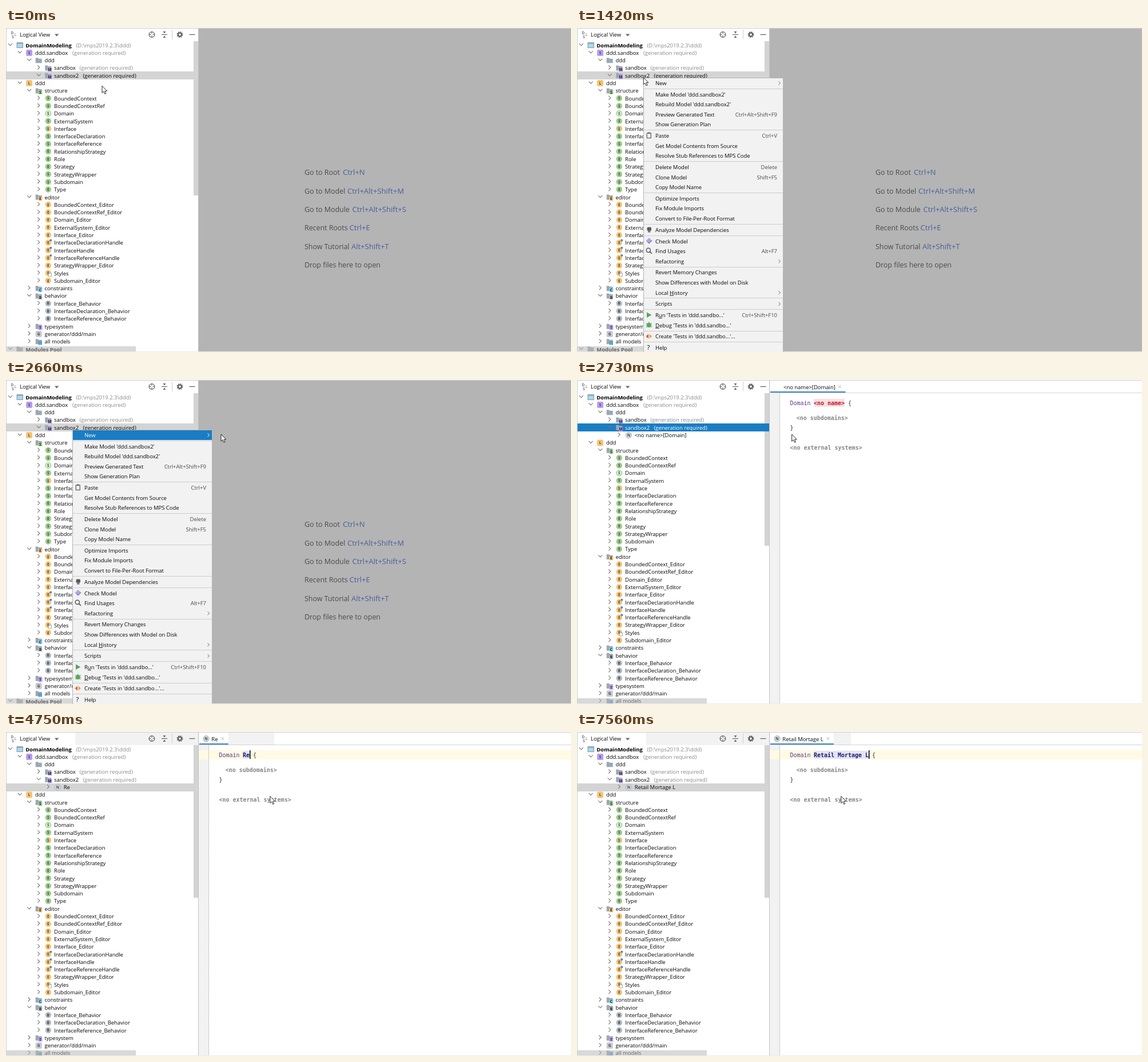
An HTML page for the animation above (8000 ms loop, 988 by 567 pixels).

```html
<!DOCTYPE html>
<html lang="en">
<head>
<meta charset="utf-8">
<title>Domain modeling</title>
<style>
html, body { margin: 0; width: 100%; height: 100%; overflow: hidden; background: #fff; }
svg { display: block; width: 988px; height: 567px; }
text { font: 9.5px "Open Sans", "Noto Sans", sans-serif; letter-spacing: -.04px; fill: #080808; white-space: pre; }
.b { font-weight: 700; fill: #000; }
.dim { fill: #8a8a8a; }
.badge { font-size: 6.5px; font-weight: 700; text-anchor: middle; letter-spacing: 0; }
.end { text-anchor: end; fill: #4a4a4a; }
.hint { font-size: 12.4px; fill: #4b4b4b; letter-spacing: 0; }
.key { font-size: 13px; fill: #4a5f9b; letter-spacing: 0; }
.code { font: 9.97px "DejaVu Sans Mono", monospace; letter-spacing: 0; }
.code.b { font-weight: 700; }
.focus text:not(.badge) { fill: #fff; }
.lit text:not(.badge) { fill: #080808; }
</style>
</head>
<body>
<svg id="stage" viewBox="0 0 988 567"></svg>
<script>
const NS = "http://www.w3.org/2000/svg";
const stage = document.getElementById("stage");
const LOOP = 8000, PITCH = 13.3, TOP = 30.1;
const GREEN = "#9ccf8d", ORANGE = "#f7c473", GRAY = "#b4bec6", PURPLE = "#b99bf0", BLUE = "#1a7dc4";

function el(parent, name, attrs = {}, content) {
  const node = document.createElementNS(NS, name);
  for (const k in attrs) node.setAttribute(k, attrs[k]);
  if (content !== undefined) node.textContent = content;
  return parent.appendChild(node);
}
const group = (p, attrs) => el(p, "g", attrs);
const rect = (p, x, y, width, height, fill, more) => el(p, "rect", { x, y, width, height, fill, ...more });
const circle = (p, cx, cy, r, fill, more) => el(p, "circle", { cx, cy, r, fill, ...more });
const line = (p, d, stroke, w = 1, more) => el(p, "path", { d, stroke, "stroke-width": w, fill: "none", ...more });
const shape = (p, d, fill) => el(p, "path", { d, fill });
const label = (p, x, y, s, cls = "") => el(p, "text", { x, y: y + 3.4, class: cls }, s);
const show = (node, on) => node.setAttribute("display", on ? "inline" : "none");

function badge(p, x, y, s, fill = "#444") {
  el(p, "text", { x, y: y + 2.4, class: "badge", style: `fill:${fill}` }, s);
}

function chevron(p, x, y, open) {
  line(p, open ? `M${x - 3.5} ${y - 2.5}l3.5 3.5 3.5-3.5` : `M${x - 2} ${y - 4}l3.5 3.5-3.5 3.5`, "#777", 1.1);
}

function folder(p, x, y) {
  shape(p, `M${x - 5.5} ${y - 4.5}h4l1.5 1.5h5.5v7.5h-11z`, "#9ba8b1");
}

// Icon kinds: tile, concept disc, node, module, folder with an optional badge
function icon(p, kind, x, y, s, color) {
  if (kind === "tile") {
    rect(p, x - 5.5, y - 5.5, 11, 11, color, { rx: 2.5 });
    badge(p, x, y, s);
  } else if (kind === "disc") {
    const ring = color === "ring", half = color === "half";
    circle(p, x, y - .3, 5.3, ring ? "#d9f0d0" : half ? GREEN : color);
    if (ring) circle(p, x, y - .3, 4.9, "none", { stroke: "#7dbd6b", "stroke-width": .9 });
    if (half) shape(p, `M${x} ${y - 5.6}a5.3 5.3 0 0 1 0 10.6z`, ORANGE);
    badge(p, x, y - .3, s);
  } else if (kind === "node") {
    circle(p, x, y, 5.2, "#d3d9de", { stroke: "#9aa5ad", "stroke-width": .8 });
    badge(p, x, y, s);
  } else if (kind === "module") {
    rect(p, x - 5.5, y - 5, 11.5, 10, "#8fa0ac");
    rect(p, x - 4.3, y - 2.5, 9, 6.3, "#a9dcf2");
  } else {
    folder(p, x, y);
    if (s === "#") {
      for (const [i, j] of [[0, 0], [3.4, 0], [0, 3.4], [3.4, 3.4]]) rect(p, x + i - .5, y + j - .5, 2.8, 2.8, "#3b9fd0");
    } else if (s) {
      rect(p, x - .8, y - .8, 7, 6.8, color);
      badge(p, x + 2.7, y + 2.7, s, "#222");
    }
  }
}

function row(p, index, [depth, open, kind, s, color, text, note, extra]) {
  const g = group(p), y = TOP + index * PITCH, step = depth * 16.6;
  chevron(g, 7.5 + step, y - .5, open);
  icon(g, kind, 24 + step, y, s, color);
  if (extra === "dot") circle(g, 28.5 + step, y - 4.5, 2, "#4a86cf");
  if (extra === "doc") rect(g, 24.5 + step, y, 5, 5.5, "#fff", { stroke: "#8d98a0", "stroke-width": .8 });
  const t = label(g, 34.3 + step, y, text, depth ? "" : "b");
  if (note) label(g, note[0], y, note[1], "dim");
  return { g, t };
}

// Project tree
const NEEDS = "(generation required)";
const concepts = "BoundedContext:S BoundedContextRef:S Domain:S:ring ExternalSystem:S Interface:S:half InterfaceDeclaration:S InterfaceReference:S RelationshipStrategy:E Role:E Strategy:E StrategyWrapper:S Subdomain:S Type:E";
const editors = "BoundedContext_Editor BoundedContextRef_Editor Domain_Editor ExternalSystem_Editor Interface_Editor InterfaceDeclarationHandle InterfaceHandle InterfaceReferenceHandle StrategyWrapper_Editor Styles Subdomain_Editor";
const upper = [
  [0, 1, "module", "", "", "DomainModeling", [122.5, "(D:\\mps2019.2.3\\ddd)"]],
  [1, 1, "tile", "S", PURPLE, "ddd.sandbox", [116, NEEDS]],
  [2, 1, "folder", "", "", "ddd"],
  [3, 0, "folder", "M", PURPLE, "sandbox", [128.5, NEEDS]],
  [3, 1, "folder", "M", PURPLE, "sandbox2", [134.5, NEEDS]]
];
const lower = [
  [1, 1, "tile", "L", ORANGE, "ddd"],
  [2, 1, "folder", "S", GREEN, "structure"],
  ...concepts.split(" ").map(c => {
    const [name, s, color = GREEN] = c.split(":");
    return [3, 0, "disc", s, color, name];
  }),
  [2, 1, "folder", "E", ORANGE, "editor"],
  ...editors.split(" ").map(name => [3, 0, "disc", "E", ORANGE, name, null,
    name.endsWith("Handle") ? "dot" : name === "Styles" ? "doc" : ""]),
  [2, 0, "folder", "C", "#7fd0ea", "constraints"],
  [2, 1, "folder", "B", GRAY, "behavior"],
  ...["Interface", "InterfaceDeclaration", "InterfaceReference"].map(n => [3, 0, "disc", "B", GRAY, n + "_Behavior"]),
  [2, 0, "folder", "T", PURPLE, "typesystem"],
  [2, 0, "tile", "G", "#c3cad0", "generator/ddd/main"],
  [2, 0, "folder", "#", "", "all models"],
  [0, 1, "folder", "", "", "Modules Pool"]
];

rect(stage, 0, 0, 988, 567, "#fff");
const vbar = rect(stage, 328, 23, 8, 270, "#d3d3d3");
const mark = rect(stage, 1, 76, 335, 14, "#d4d4d4");
const frameRow = rect(stage, 1, 76.5, 335, 13, "none", { stroke: "#dedede" });
const modelRow = upper.map((r, i) => row(stage, i, r))[4];
const nodeRow = row(stage, 5, [4, 0, "node", "N", "", "<no name>[Domain]"]);
const rest = group(stage);
lower.forEach((r, i) => row(rest, i + 5, r));
rect(stage, 0, 557, 227, 9, "#b9b9b9", { opacity: .55 });

// Tool window header
const header = rect(stage, 121, 1, 215, 22, "#f2f2f2");
badge(stage, 11, 9, "D", "#3a7fc0");
badge(stage, 16.5, 12, "L", "#d99a2b");
badge(stage, 12, 15.2, "S", "#7d62bd");
label(stage, 24, 12, "Logical View");
shape(stage, "M85 10.5h7.4l-3.7 4z", "#666");
circle(stage, 255, 11.5, 4.8, "none", { stroke: "#666", "stroke-width": 1.2 });
line(stage, "M255 6v4m0 3v4M249.500 11.500h4m3 0h4", "#666", 1.2);
line(stage, "M272 11.500h10", "#666", 1.2);
shape(stage, "M274.500 6h5l-2.500 3.500zM274.500 17h5l-2.500-3.500z", "#666");
line(stage, "M290.500 3v17", "#d0d0d0");
circle(stage, 304, 11.5, 3, "none", { stroke: "#616161", "stroke-width": 2.2 });
circle(stage, 304, 11.5, 4.6, "none", { stroke: "#616161", "stroke-width": 1.8, "stroke-dasharray": "1.9 1.71" });
line(stage, "M320.500 11.500h10", "#666", 1.3);

// Empty workspace
const empty = group(stage);
rect(empty, 337, 1, 651, 565, "#b4b4b4");
[["Go to Root", 589, "Ctrl+N"], ["Go to Model", 597, "Ctrl+Alt+Shift+M"], ["Go to Module", 605.5, "Ctrl+Alt+Shift+S"],
 ["Recent Roots", 600.5, "Ctrl+E"], ["Show Tutorial", 604, "Alt+Shift+T"], ["Drop files here to open"]
].forEach(([s, x, key], i) => {
  const y = 253.8 + i * 32.4;
  label(empty, 522, y, s, "hint");
  if (key) label(empty, x, y, key, "key");
});

// Editor
const editor = group(stage);
rect(editor, 337, 1, 651, 565, "#fff");
rect(editor, 337, 23, 18, 543, "#f2f2f2");
const oldTab = rect(editor, 337, 1, 132, 21.5, "#f2f2f2");
line(editor, "M337 22.500H988", "#d4d4d4");
const tab = rect(editor, 338, 1, 131, 20, "#fff");
const tabLine = rect(editor, 338, 20, 131, 2, "#3f83c5");
const tabIcon = group(editor);
icon(tabIcon, "node", 350, 11.7, "N");
const tabText = label(editor, 361, 12.2, "");
const tabClose = line(editor, "M-2.500-2.500l5 5m0-5l-5 5", "#aaa", .9);
const current = rect(editor, 337, 32, 651, 16, "#fffae3");
line(editor, "M354.500 23V566", "#b8b8b8", 1, { "stroke-dasharray": "2 1" });
const cell = rect(editor, 414, 33, 54, 14, "#ffdfdf");
const code = (x, y, s, cls, fill) => {
  const t = label(editor, x, y, s, "code " + cls);
  t.style.fill = fill;
  return t;
};
code(372.6, 40.6, "Domain", "", "#5b3a92");
const nameText = code(414, 40.6, "", "b", "");
const brace = code(474, 40.6, "{", "", "#333");
code(383.8, 66.7, "<no subdomains>", "b", "#858585");
code(372.6, 83.3, "}", "", "#333");
code(372.6, 118.4, "<no external systems>", "b", "#858585");
const caret = rect(editor, 414, 32, 1.5, 15, "#000");

// Window edges
line(stage, "M0 .5H988M.5 0V567", "#cfcfcf");
line(stage, "M336.500 1V566", "#c2c2c2");
rect(stage, 0, 566, 988, 1, "#ececec");

// Context menu; "-" starts a section, "&" underlines the next letter, ">" opens a submenu
const menuItems = ["New|>", "-Make Model 'ddd.sandbox2'", "Rebuild Model 'ddd.sandbox2'", "Preview Generated Text|Ctrl+Alt+Shift+F9",
  "Show Generation Plan", "-Paste|Ctrl+V", "Get Model Contents from Source", "Resolve Stub References to MPS Code",
  "-Delete Model|Delete", "Clone Model|Shift+F5", "Copy Model Name", "-Optimize Imports", "Fix Module Imports",
  "Convert to File-Per-Root Format", "-Analyze Model Dependencies", "-Check Model", "Find Usages|Alt+F7", "Refactoring|>",
  "-Revert Memory Changes", "Show Differences with Model on Disk", "Local &History|>", "-Scripts|>",
  "-R&un 'Tests in 'ddd.sandbo...'|Ctrl+Shift+F10", "&Debug 'Tests in 'ddd.sandbo...'", "-Create 'Tests in 'ddd.sandbo...'...", "-Help"];
const STEP = 17.57, GAP = 2.2;
const menu = group(stage);
rect(menu, 116.5, 87.5, 244, 485, "#f2f2f2", { stroke: "#b5b5b5" });
const hover = rect(menu, 117, 88, 243, 17, BLUE);
const hoverParts = [];
let my = 96.4 - STEP;
menuItems.forEach((item, i) => {
  const section = item[0] === "-";
  my += STEP + (section ? GAP : 0);
  if (section) line(menu, `M117 ${Math.floor(my - 10) + .5}H360`, "#cdcdcd");
  const [s, key] = (section ? item.slice(1) : item).split("|");
  const [before, after] = s.split("&");
  const t = label(menu, 137, my, before);
  if (after) {
    el(t, "tspan", { "text-decoration": "underline" }, after[0]);
    el(t, "tspan", {}, after.slice(1));
  }
  if (!i) hoverParts.push(t);
  if (key === ">") {
    const a = line(menu, `M352.500 ${my - 3}l3 3-3 3`, "#666");
    if (!i) hoverParts.push(a);
  } else if (key) label(menu, 350, my, key, "end");
});
rect(menu, 122.3, 184, 7, 8.5, "none", { stroke: "#666", "stroke-width": 1.3 });
rect(menu, 124, 182.5, 3.6, 2.5, "#666");
rect(menu, 122.5, 348.5, 7.5, 6.5, "#5a5a5a", { rx: 2 });
rect(menu, 124, 355.5, 4.5, 2, "#5a5a5a");
shape(menu, "M126 367l5.500 5.500-5.500 5.500-5.500-5.500z", "#b5a3dc");
line(menu, "M123.500 374l2.500 2.500 5-5", "#7a8fd0", 1.3);
circle(menu, 124.8, 388.8, 3.6, "none", { stroke: "#555", "stroke-width": 1.5 });
line(menu, "M127.500 391.500l3.500 3.500", "#555", 1.7);
shape(menu, "M122 497.500l8.500 4.700-8.500 4.700z", "#56a65f");
circle(menu, 125.8, 520, 3.8, "#56a65f");
line(menu, "M120.500 517h10.500m-10.500 3h10.500m-10.500 3h10.500M125.800 514v3", "#56a65f", 1.1);
shape(menu, "M125 535.500v8l-4.500-4z", "#dd5a3c");
shape(menu, "M126.500 535.500v8l4.500-4z", "#e8a33a");
label(menu, 122.5, 560, "?").style.fontSize = "11px";

// Submenu
const submenu = group(stage);
rect(submenu, 361.5, 87.5, 81, 65, "#f2f2f2", { stroke: "#b5b5b5" });
const subHover = rect(submenu, 362, 88, 80, 17, BLUE);
const subText = ["Domain", "Model", "Package"].map((s, i) => label(submenu, 382, 96.6 + i * 20.5, s))[0];
icon(submenu, "disc", 371, 97, "S", "ring");
line(submenu, "M362 106.500H442", "#cdcdcd");

const pointer = el(stage, "path", {
  d: "M0 0V12.200L2.800 9.600 4.900 14.200 6.900 13.300 4.900 8.900H8.700Z",
  fill: "#fff", stroke: "#111", "stroke-width": .9
});

// Pointer stops: time, x, y
const path = [[0, 168, 101.3], [270, 168, 101.3], [560, 146, 101.3], [790, 116.2, 86.7], [1440, 116.2, 86.7], [1720, 119, 92],
  [2000, 190, 97], [2400, 350, 97], [2580, 376.3, 95], [2700, 376, 95], [2760, 375.3, 95.2], [3300, 461.8, 112.3]];
// Keystroke times for the typed name
const typed = "Retail Mortage L";
const keys = [4520, 4680, 4900, 5150, 5150, 5450, 5850, 6250, 6400, 6480, 6700, 6860, 7000, 7130, 7240, 7480];
const LAG = 70;

const countAt = t => keys.filter(k => k <= t).length;

function pointerAt(t) {
  const i = path.findIndex(p => p[0] > t);
  if (i < 0) return path[path.length - 1].slice(1);
  const [a, b] = [path[i - 1], path[i]];
  const u = (t - a[0]) / (b[0] - a[0]), e = u * u * (3 - 2 * u);
  return [a[1] + (b[1] - a[1]) * e, a[2] + (b[2] - a[2]) * e];
}

function render(t) {
  const opened = t >= 2730, inside = t >= 2910;
  const n = countAt(t), shown = countAt(t - LAG);
  const focused = (t >= 940 && t < 1030) || (opened && !inside);

  // Tree
  rest.setAttribute("transform", `translate(0 ${opened ? PITCH : 0})`);
  vbar.setAttribute("height", opened ? 267 : 270);
  show(nodeRow.g, opened);
  mark.setAttribute("y", inside ? 90 : 76);
  mark.setAttribute("fill", focused ? BLUE : "#d4d4d4");
  modelRow.g.setAttribute("class", focused ? "focus" : inside ? "" : "lit");
  show(frameRow, inside && t < 4520);
  show(header, t >= 4520);
  const title = shown ? typed.slice(0, shown) : "<no name>[Domain]";
  nodeRow.t.textContent = title;

  // Menus
  const hot = t >= 1500, picked = t >= 2440;
  show(menu, t >= 1030 && !opened);
  show(hover, hot);
  hoverParts[0].style.fill = hot ? "#fff" : "";
  hoverParts[1].setAttribute("stroke", hot ? "#fff" : "#666");
  show(submenu, t >= 1720 && t < 2660);
  show(subHover, picked);
  subText.style.fill = picked ? "#fff" : "";

  // Editor
  show(empty, !opened);
  show(editor, opened);
  show(current, inside);
  show(tabIcon, inside);
  const tx = shown ? 359.3 : 361;
  tabText.textContent = title;
  tabText.setAttribute("x", tx);
  const close = shown ? tx + tabText.getComputedTextLength() + 8.4 : 459.5;
  tabClose.setAttribute("transform", `translate(${close} 11.7)`);
  tab.setAttribute("width", close - 328);
  tabLine.setAttribute("width", close - 328);
  oldTab.setAttribute("width", shown > 14 ? 142 : 132);
  nameText.textContent = n ? typed.slice(0, n) : "<no name>";
  nameText.style.fill = n ? "#1d1d5e" : "#b8182f";
  const len = n || 9;
  cell.setAttribute("width", len * 6);
  cell.setAttribute("fill", n ? "#e2e4fa" : inside ? "#f9d7dc" : "#ffdfdf");
  brace.setAttribute("x", 420 + len * 6);
  caret.setAttribute("x", 414 + n * 6);
  show(caret, inside && (t < 3300 || (t >= 3740 && t < 4310) || t >= 4520));

  pointer.setAttribute("transform", `translate(${pointerAt(t).join(" ")})`);
}

function tick() {
  render(performance.now() % LOOP);
  requestAnimationFrame(tick);
}
tick();
</script>
</body>
</html>
```
